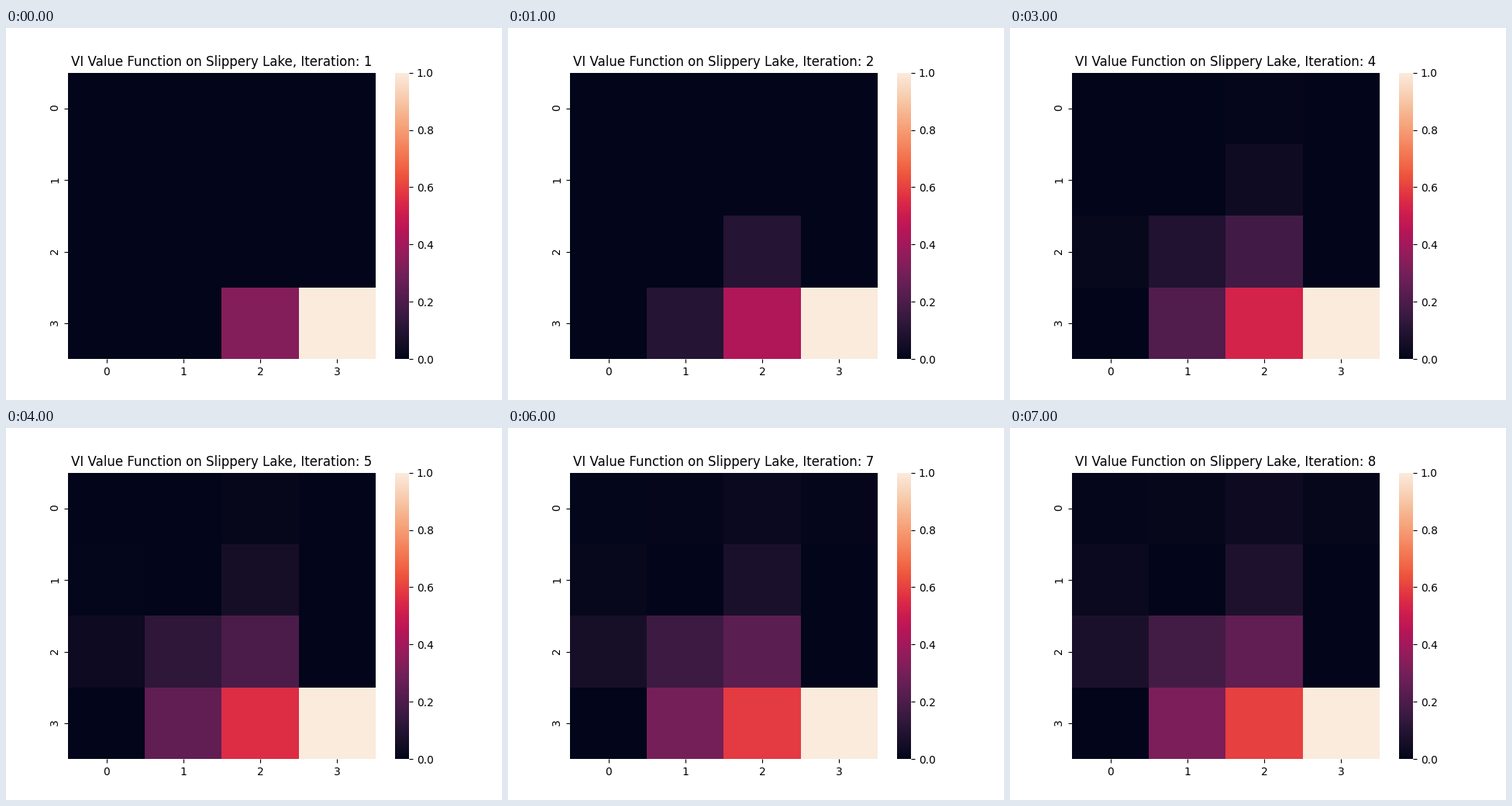
A matplotlib script for the animation above (8 s loop, 640 px wide and 480 px high).

```python
import matplotlib.pyplot as plt
import numpy as np
from matplotlib.animation import FuncAnimation
from matplotlib.colors import LinearSegmentedColormap

SIZE = 4
GAMMA = 0.9
ITERATIONS = 8
HOLES = {(1, 1), (1, 3), (2, 3), (3, 0)}
GOAL = (3, 3)
MOVES = [(0, -1), (1, 0), (0, 1), (-1, 0)]

# Dark-to-light colour ramp: colour index out of 255, hex value
RAMP = [
    (0, "#03051a"), (6, "#0a091f"), (12, "#130d25"), (255 / 11, "#221331"),
    (36, "#35193e"), (510 / 11, "#451c47"), (765 / 11, "#6a1f56"),
    (85, "#841e5a"), (1020 / 11, "#921c5b"), (109, "#ad1759"),
    (1275 / 11, "#b91657"), (128, "#cb1b4f"), (1530 / 11, "#d92847"),
    (146, "#e13342"), (1785 / 11, "#ed513e"), (170, "#f06043"),
    (182, "#f37651"), (2040 / 11, "#f47c56"), (2295 / 11, "#f6a47b"),
    (219, "#f6b48f"), (2550 / 11, "#f7c9aa"), (255, "#faebdd"),
]
cmap = LinearSegmentedColormap.from_list(
    "ember", [(i / 255, color) for i, color in RAMP], N=256)


def outcome(values, row, col, move):
    """Reward plus discounted value after sliding one step."""
    dr, dc = MOVES[move % 4]
    cell = (min(max(row + dr, 0), SIZE - 1), min(max(col + dc, 0), SIZE - 1))
    return 1.0 if cell == GOAL else GAMMA * values[cell]


def sweep(values):
    """One synchronous value iteration on slippery ice."""
    new = np.zeros_like(values)
    for row, col in np.ndindex(values.shape):
        if (row, col) in HOLES:
            continue
        new[row, col] = max(
            sum(outcome(values, row, col, a + slip) for slip in (-1, 0, 1)) / 3
            for a in range(4))
    new[GOAL] = 1.0
    return new


history = [sweep(np.zeros((SIZE, SIZE)))]
while len(history) < ITERATIONS:
    history.append(sweep(history[-1]))

fig, ax = plt.subplots(figsize=(6.4, 4.8), dpi=100)
mesh = ax.pcolormesh(history[0], cmap=cmap, vmin=0, vmax=1)
ax.set(xlim=(0, SIZE), ylim=(SIZE, 0))
ax.spines[:].set_visible(False)

bar = fig.colorbar(mesh, ax=ax)
bar.outline.set_linewidth(0)

centers = np.arange(SIZE) + 0.5
ax.set_xticks(centers, range(SIZE))
ax.set_yticks(centers, range(SIZE), rotation="vertical")
title = ax.set_title("")


def draw(i):
    mesh.set_array(history[i])
    title.set_text(f"VI Value Function on Slippery Lake, Iteration: {i + 1}")
    return mesh, title


anim = FuncAnimation(fig, draw, frames=ITERATIONS, interval=1000,
                     repeat=True, repeat_delay=0)
plt.show()
```
